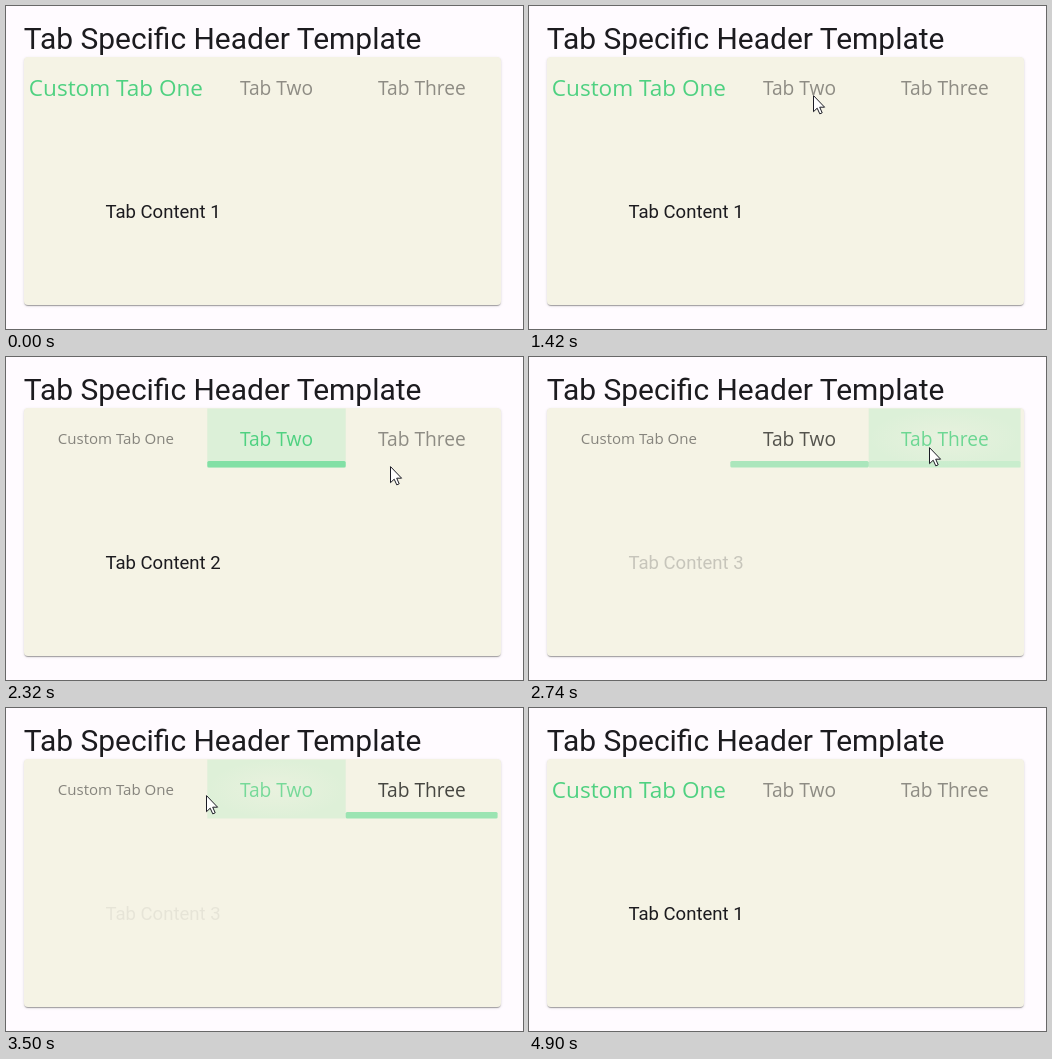
Recreate the animation shown at these times as an HTML page. Size 517 px wide and 323 px high, loop 5.57 s.

```html
<!DOCTYPE html>
<html lang="en">
<head>
<meta charset="utf-8">
<title>Tab Specific Header Template</title>
<style>
html, body { margin: 0; width: 100%; height: 100%; overflow: hidden; background: #fffbff; }
svg { position: absolute; left: 0; top: 0; }
.card {
  position: absolute; left: 18px; top: 51px; width: 477px; height: 248px;
  border-radius: 4px; background: #f5f3e5;
  box-shadow: 0 2px 1px -1px rgba(0, 0, 0, .2), 0 1px 1px rgba(0, 0, 0, .14), 0 1px 3px rgba(0, 0, 0, .12);
}
.roboto { font-family: Roboto, sans-serif; fill: #1c1b1f; }
.tab { font-family: "Open Sans", "Noto Sans", sans-serif; font-size: 19.2px; text-anchor: middle; }
</style>
</head>
<body>
<div class="card"></div>
<svg width="517" height="323" viewBox="0 0 517 323">
  <defs>
    <radialGradient id="glow">
      <stop offset="0" stop-color="#f5f3e5" stop-opacity=".5"/>
      <stop offset="1" stop-color="#f5f3e5" stop-opacity="0"/>
    </radialGradient>
  </defs>
  <text class="roboto" x="17.7" y="43" font-size="29.95">Tab Specific Header Template</text>
  <g id="tabs"></g>
  <text id="content" class="roboto" x="99.4" y="212" font-size="18.56"></text>
  <path id="cursor" d="M.5 .6V16.7L4.2 13.2L6.8 18.9L9.2 17.8L6.7 12.2H11.6Z"
        fill="#fff" stroke="#1b1b24" stroke-width="1"/>
</svg>
<script>
const LOOP = 5570, START = 720, TICK = 69.67, FADE = 300;
const GREEN = [79, 209, 129], DARK = [50, 50, 46], GRAY = [142, 140, 132];

// Times are counted in ticks after the cursor first appears.
const clicks = [
  { at: -99, tab: 0 }, { at: 13.95, tab: 1 }, { at: 26.4, tab: 2 }, { at: 37.98, tab: 1 }, { at: 46.56, tab: 0 }
];
const moves = [
  { by: 6, over: 6, x: 276, y: 105 },
  { by: 7, over: 1, x: 284, y: 97 },
  { by: 10, over: 2, x: 284, y: 89 },
  { by: 23, over: 3, x: 384, y: 109 },
  { by: 28, over: 5, x: 400, y: 90 },
  { by: 33, over: 4, x: 322, y: 87 },
  { by: 40, over: 7, x: 200, y: 87 },
  { by: 43, over: 3, x: 125, y: 73 },
  { by: 45, over: 1, x: 137, y: 78 },
  { by: 48, over: 1, x: 137, y: 85 },
  { by: 59, over: 6, x: 457, y: 304 }
];

const $ = id => document.getElementById(id);
const clamp = v => Math.max(0, Math.min(1, v));
const smooth = v => v * v * (3 - 2 * v);
const mix = (a, b, f) => a + (b - a) * f;
const rgb = c => `rgb(${c.map(Math.round)})`;

function add(name, attrs) {
  const el = document.createElementNS("http://www.w3.org/2000/svg", name);
  for (const key in attrs) el.setAttribute(key, attrs[key]);
  return $("tabs").appendChild(el);
}

const box = (x, y, width, height, fill) => add("rect", { x, y, width, height, fill });

function makeTab(label, left, right, center) {
  const width = right - left;
  const shade = box(left, 51.5, width, 59, "rgba(130,224,165,.21)");
  const glow = box(left, 51.5, width, 59, "url(#glow)");
  const bar = box(left, 104, width, 6.5, "#82e0a5");
  bar.setAttribute("rx", 1.5);
  const text = add("text", { class: "tab", x: center, y: 88.6 });
  text.textContent = label;
  return { shade, glow, bar, text };
}

const pale = box(18, 54, 202, 56, "#fbfaf0");
const custom = add("text", { class: "tab", x: 109.9 });
custom.textContent = "Custom Tab One";
const tabs = [null, makeTab("Tab Two", 201.3, 339.7, 270.5), makeTab("Tab Three", 339.7, 491.6, 415.9)];

function drawTab(tab, on, off, p) {
  tab.shade.style.opacity = on ? clamp(2 * p) : 0;
  tab.glow.style.opacity = on ? Math.sin(Math.PI * p) : 0;
  tab.bar.style.opacity = on ? clamp(2 * p - 1) : off ? 1 - p * p : 0;
  const ink = on ? GREEN : off ? DARK.map((v, n) => mix(v, GRAY[n], p * p)) : GRAY;
  tab.text.setAttribute("fill", rgb(ink));
  tab.text.style.opacity = on ? mix(.5, 1, p) : 1;
}

function cursorAt(tick) {
  let x = 432, y = 302;
  for (const move of moves) {
    const f = smooth(clamp(1 - (move.by - tick) / move.over));
    x = mix(x, move.x, f);
    y = mix(y, move.y, f);
  }
  return [x, y].map(Math.round);
}

function draw(time) {
  const tick = Math.floor((time - START + 8) / TICK);
  const index = clicks.findLastIndex(c => c.at <= tick);
  const current = clicks[index].tab;
  const previous = index ? clicks[index - 1].tab : -1;
  const p = clamp((tick - clicks[index].at) * TICK / FADE);

  const first = current === 0;
  custom.style.fontSize = first ? "22.56px" : "15.04px";
  custom.setAttribute("y", first ? 89.8 : 86.8);
  custom.setAttribute("fill", rgb(first ? GREEN : [134, 132, 125]));
  pale.style.opacity = first ? Math.sin(Math.PI * p) : 0;

  tabs.forEach((tab, i) => tab && drawTab(tab, i === current, i === previous, p));

  $("content").textContent = "Tab Content " + ((p < .5 ? previous : current) + 1);
  $("content").style.opacity = Math.abs(2 * p - 1);

  $("cursor").setAttribute("transform", `translate(${cursorAt(tick)})`);
  $("cursor").style.display = tick >= 0 && tick < 60 ? "" : "none";
}

const begin = performance.now();
function frame() {
  draw((performance.now() - begin) % LOOP);
  requestAnimationFrame(frame);
}
frame();
</script>
</body>
</html>
```
